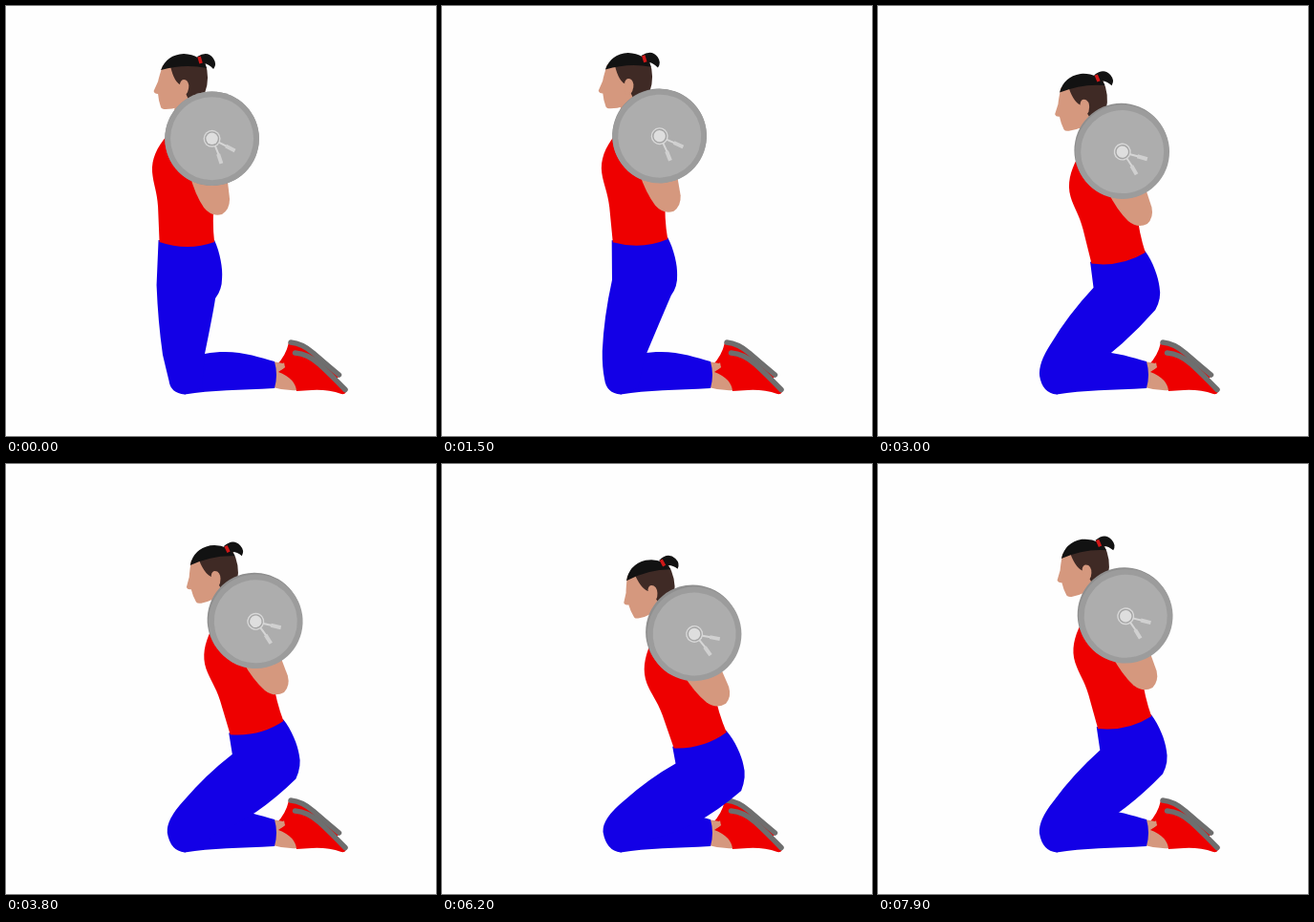
An HTML page with a canvas for the animation above (8 s loop, 450 by 450 pixels).

```html
<!DOCTYPE html>
<html lang="en">
<head>
<meta charset="utf-8">
<title>Kneeling squat</title>
<style>
html, body { margin: 0; width: 100%; height: 100%; overflow: hidden; background: #fefefe; }
canvas { display: block; width: 450px; height: 450px; }
</style>
</head>
<body>
<canvas id="stage" width="450" height="450"></canvas>
<script>
const ctx = document.getElementById('stage').getContext('2d');
const LOOP = 8000, STEP = 100;
const BLUE = '#1300e6', RED = '#ee0000', SOLE = '#6e6e6e';
const SKIN = '#d5987e', HAIR = '#121212', SIDE = '#3f2a25';
const KNEE = [187, 388], HIP = [181, 282];
const rad = d => d * Math.PI / 180;

// Squat depth over time: [ms, depth]
const depthKeys = [[0, 0], [800, .028], [1400, .16], [2100, .393], [2700, .592], [3000, .686],
  [3600, .818], [4600, .955], [5400, .995], [5850, 1.003], [6200, 1], [7200, .91], [7900, .78]];

function depthAt(t) {
  const k = depthKeys, last = k.length - 1;
  if (t >= k[last][0]) return k[last][1];
  const i = k.findIndex(p => p[0] > t) - 1;
  const slope = j => {
    if (j === 0) return 0;
    const a = k[j - 1], b = k[Math.min(j + 1, last)];
    return (b[1] - a[1]) / (b[0] - a[0]);
  };
  const [t0, a] = k[i], [t1, b] = k[i + 1], d = t1 - t0, s = (t - t0) / d;
  const s2 = s * s, s3 = s2 * s;
  return a * (2 * s3 - 3 * s2 + 1) + b * (3 * s2 - 2 * s3)
    + d * (slope(i) * (s3 - 2 * s2 + s) + slope(i + 1) * (s3 - s2));
}

// Maps upright coordinates: turn about `from`, then move that pivot to `to`
function mapper(from, to, angle) {
  const c = Math.cos(angle), s = Math.sin(angle);
  return (x, y) => {
    const dx = x - from[0], dy = y - from[1];
    return `${(to[0] + dx * c - dy * s).toFixed(2)} ${(to[1] + dx * s + dy * c).toFixed(2)} `;
  };
}

function fill(d, color) {
  ctx.fillStyle = color;
  ctx.fill(new Path2D(d));
}

function line(d, color, width, cap = 'round') {
  ctx.strokeStyle = color;
  ctx.lineWidth = width;
  ctx.lineCap = cap;
  ctx.stroke(new Path2D(d));
}

function disc(x, y, r, color) {
  ctx.fillStyle = color;
  ctx.beginPath();
  ctx.arc(x, y, r, 0, 7);
  ctx.fill();
}

function shoe(sole, upper) {
  fill(sole + upper, RED);
  line(sole, SOLE, 5.5);
}

function drawFeet() {
  shoe('M298 352Q310 353 322 363.5T348.5 386', 'Q348 391 343 390L300 385L283 376Q293 366 296 352Z');
  fill('M279 372L290 374L306 402Q292 403 279 399Z', SKIN);
  shoe('M302.5 363Q316 364 328 375T355 401.5', 'Q357 407 351 406Q336 401 320 402L304 403Q303 390 285 383Q298 376 301 363Z');
  fill('M282 374Q289 377 291 373Q293 379 287 381L282 380Z', SKIN);
}

function drawLegs(u, hip, lean) {
  const P = mapper(HIP, hip, -lean), T = mapper(KNEE, KNEE, rad(56.8 * u)), fold = u * u;
  fill('M187 406.5C215 402 245 402 281 400Q285 386 281 372C262 367 240 358 208 364L178 380Z', BLUE);
  fill('M' + P(159.5, 245) + 'L' + P(218, 245)
    + 'C' + P(224, 258) + P(227 - u, 275) + P(226 - u, 285)
    + 'Q' + P(226 - u, 297) + P(219 - 4 * u, 306 + 4 * fold)
    + 'Q' + T(217 + 9 * fold, 320) + T(208, 364)
    + `L205 400L187 406.5Q172 405 ${170.5 - 2 * u} ${392 - 7 * u}`
    + `Q167.5 ${380 - 9 * u} ` + T(164 - 5 * u, 365)
    + 'Q' + T(159 - 5 * u, 330) + P(157.5, 292 - 29 * u) + 'Z', BLUE);
}

function drawHead() {
  fill('M164 62Q160 74 159 79L154.5 89Q155 92 159 92L160 99L162 106Q163 108 167 108Q174 108 180 106L195 97L192 58Z', SKIN);
  fill('M172 58L208 58Q214 76 208 91Q200 95 191 98L184 83Q176 81 172 63Z', SIDE);
  fill('M162 67Q168 51 186 50Q204 51 210 65Q187 60 162 67Z', HAIR);
  fill('M200 53Q211 46 217 55Q221 61 217 66Q210 58 203 61Z', HAIR);
  line('M202 53L204 60', '#d01818', 3.5, 'butt');
  fill('M182 81Q184 75 189 78Q193 82 190 90Q187 96 182 92Z', SKIN);
}

function drawPlate(u) {
  const x = 215.5, y = 138.8;
  disc(x - u, y - 2.5 * u, 49.3, '#8f8f8f');
  disc(x, y, 49.3, '#9c9c9c');
  disc(x, y, 43.5, '#adadad');
  line('M219 147L223 157M223 143L232 147.5', '#d6d6d6', 2);
  line('M222 155L225.3 165M230 146.5L239.5 151.5', '#d0d0d0', 4, 'butt');
  disc(x, y, 9, '#d8d8d8');
  disc(x, y, 7.6, '#a4a4a4');
  disc(x, y, 6.2, '#dedede');
}

function drawUpperBody(u, hip, lean) {
  ctx.save();
  ctx.translate(...hip);
  ctx.rotate(-lean);
  ctx.translate(-HIP[0], -HIP[1]);
  fill('M178 98L173 126L202 130L200 94Z', SKIN);
  fill('M168 136C158 148 152 160 153 174C154 186 158 194 159 210L160.5 247Q190 257 218 247Q215.5 226 218 200L212 140Z', RED);
  fill('M192 176Q198 198 207 211Q215 221 226 218Q234 213 234 202L231 176Z', SKIN);

  ctx.save();
  ctx.translate(187, 84);
  ctx.rotate(lean - rad(12 * Math.max(u, 0) ** 1.6));
  ctx.translate(-187, -84);
  drawHead();
  ctx.restore();

  drawPlate(u);
  ctx.restore();
}

function draw(t) {
  const u = depthAt(t), thigh = rad(56.8 * u - 3.2), lean = rad(16.8 * u);
  const len = 106.2 + 3 * Math.sin(Math.PI * u);
  const hip = [KNEE[0] + len * Math.sin(thigh), KNEE[1] - len * Math.cos(thigh)];
  ctx.fillStyle = '#fefefe';
  ctx.fillRect(0, 0, 450, 450);
  drawFeet();
  drawLegs(u, hip, lean);
  drawUpperBody(u, hip, lean);
}

function tick() {
  // The motion advances in tenths of a second
  draw(Math.floor(performance.now() % LOOP / STEP) * STEP);
  requestAnimationFrame(tick);
}
tick();
</script>
</body>
</html>
```
